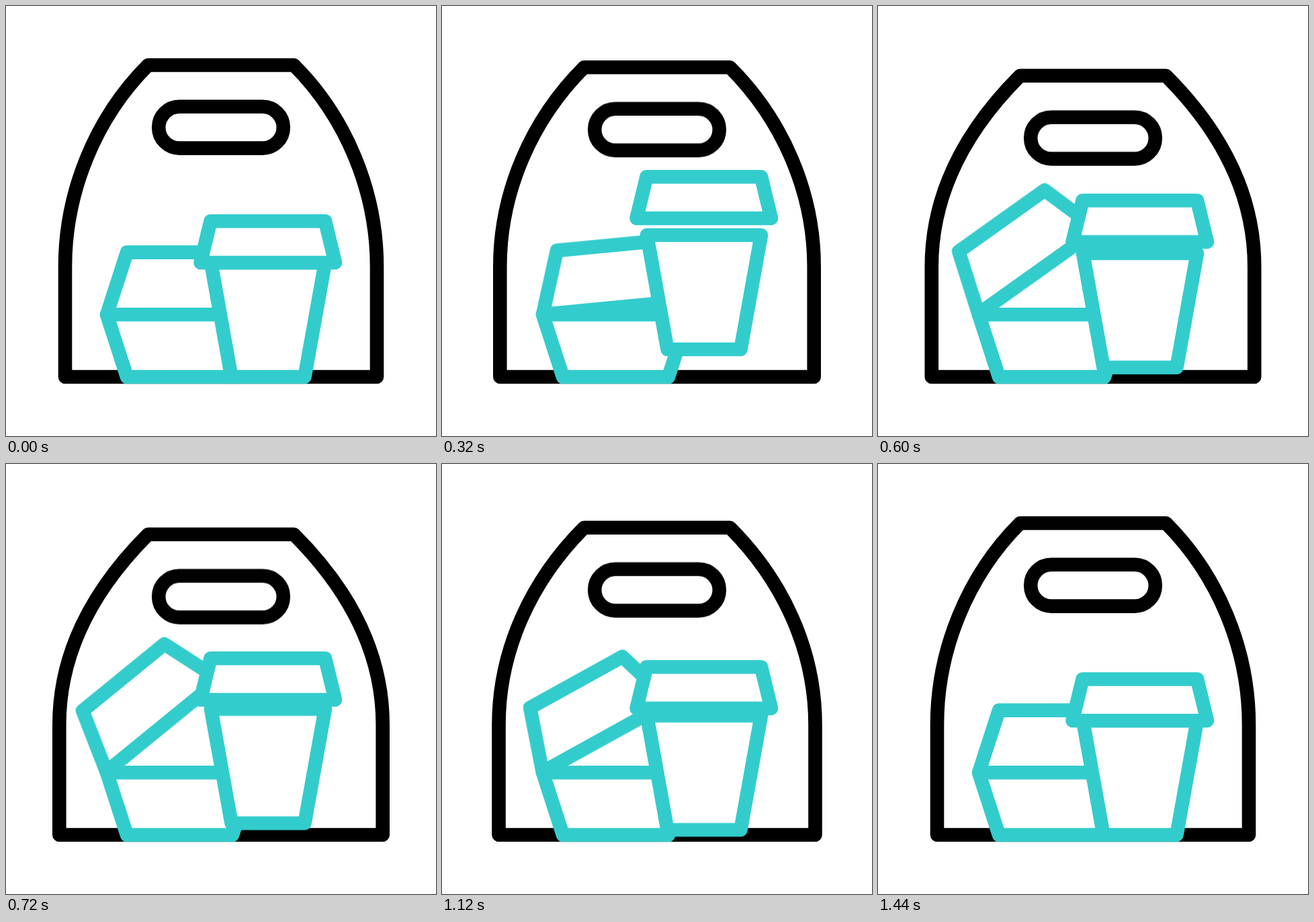
Recreate the animation shown at these times as an HTML page without scripts. Size 640 by 640 pixels, loop 1.56 s.

```html
<!DOCTYPE html>
<html lang="en">
<head>
<meta charset="utf-8">
<title>Takeaway bag</title>
<style>
  html, body { margin: 0; width: 100%; height: 100%; overflow: hidden; background: #fff; }
  svg { display: block; width: 100%; height: 100%; }

  path, rect {
    fill: #fff;
    stroke: #33cccc;
    stroke-width: 20.6;
    stroke-linejoin: round;
    animation: 1560ms linear infinite;
  }
  .bag, .handle { stroke: #000; }

  .bag { animation-name: squash; }
  .handle { animation-name: sink; }
  .box-lid { animation-name: open; transform-origin: 148px 459.5px; }
  .cup { animation-name: hop; }
  .cup-lid { animation-name: pop; }

  /* The bag and its handle share the same timing. */
  @keyframes squash {
    0%, 100% { d: path("M211.5 88H428.5C507 166.5 552 277 552 388V552H88V388C88 277 133 166.5 211.5 88Z"); }
    2.564% {
      d: path("M211.5 88H428.5C507 166.5 552 277 552 388V552H88V388C88 277 133 166.5 211.5 88Z");
      animation-timing-function: cubic-bezier(.7, 0, .42, 1);
    }
    47.436% {
      d: path("M211.5 104.7H428.5C507 183.2 560.7 277 560.7 388V552H79.3V388C79.3 277 133 183.2 211.5 104.7Z");
      animation-timing-function: cubic-bezier(.6, 0, .41, 1);
    }
    92.308% { d: path("M211.5 88H428.5C507 166.5 552 277 552 388V552H88V388C88 277 133 166.5 211.5 88Z"); }
  }
  @keyframes sink {
    0%, 92.308%, 100% { transform: translateY(0); }
    2.564% { transform: translateY(0); animation-timing-function: cubic-bezier(.7, 0, .42, 1); }
    47.436% { transform: translateY(16.7px); animation-timing-function: cubic-bezier(.6, 0, .41, 1); }
  }

  @keyframes open {
    0%, 92.308%, 100% { transform: rotate(0deg); }
    7.692% { transform: rotate(0deg); animation-timing-function: cubic-bezier(.33, 0, .67, 0); }
    20.513% { transform: rotate(-5.4deg); animation-timing-function: cubic-bezier(.33, .21, .67, .69); }
    30.769% { transform: rotate(-25.2deg); animation-timing-function: cubic-bezier(.33, .66, .67, .95); }
    46.154% { transform: rotate(-39.2deg); animation-timing-function: ease-out; }
    50% { transform: rotate(-39.5deg); animation-timing-function: cubic-bezier(.33, 0, .67, .39); }
    56.41% { transform: rotate(-38.2deg); animation-timing-function: cubic-bezier(.33, .19, .67, .31); }
    71.795% { transform: rotate(-29deg); animation-timing-function: cubic-bezier(.33, .29, .67, 1); }
  }

  @keyframes hop {
    0%, 92.308%, 100% { transform: translateY(0); }
    2.564% { transform: translateY(0); animation-timing-function: ease-in-out; }
    20.513% { transform: translateY(-41px); animation-timing-function: ease-in-out; }
    30.769% { transform: translateY(-10.6px); animation-timing-function: ease-in-out; }
    46.154% { transform: translateY(-17.4px); animation-timing-function: cubic-bezier(.33, 0, .67, .75); }
    56.41% { transform: translateY(-11.2px); }
    71.795% { transform: translateY(-7.5px); animation-timing-function: cubic-bezier(.33, .25, .67, 1); }
  }
  @keyframes pop {
    0%, 92.308%, 100% { transform: translateY(0); }
    2.564% { transform: translateY(0); animation-timing-function: ease-in-out; }
    20.513% { transform: translateY(-66px); animation-timing-function: ease-in-out; }
    30.769% { transform: translateY(-30.5px); }
    46.154% { transform: translateY(-31px); animation-timing-function: cubic-bezier(.33, 0, .67, .4); }
    56.41% { transform: translateY(-28.5px); animation-timing-function: cubic-bezier(.33, .23, .67, .58); }
    71.795% { transform: translateY(-18.3px); animation-timing-function: cubic-bezier(.33, .33, .67, 1); }
  }
</style>
</head>
<body>
<svg viewBox="0 0 640 640">
  <path class="bag" d="M211.5 88H428.5C507 166.5 552 277 552 388V552H88V388C88 277 133 166.5 211.5 88Z"/>
  <rect class="handle" x="227.2" y="149.8" width="185.6" height="61.8" rx="30.9"/>
  <path class="box-lid" d="M150 459.3L180 366.6H337L367 459.3Z"/>
  <path class="box" d="M150 459.3L180 552H337L367 459.3Z"/>
  <path class="cup" d="M305 382H475L444.5 552H335.5Z"/>
  <path class="cup-lid" d="M304.5 320.2H475L490 382H289.5Z"/>
</svg>
</body>
</html>
```
